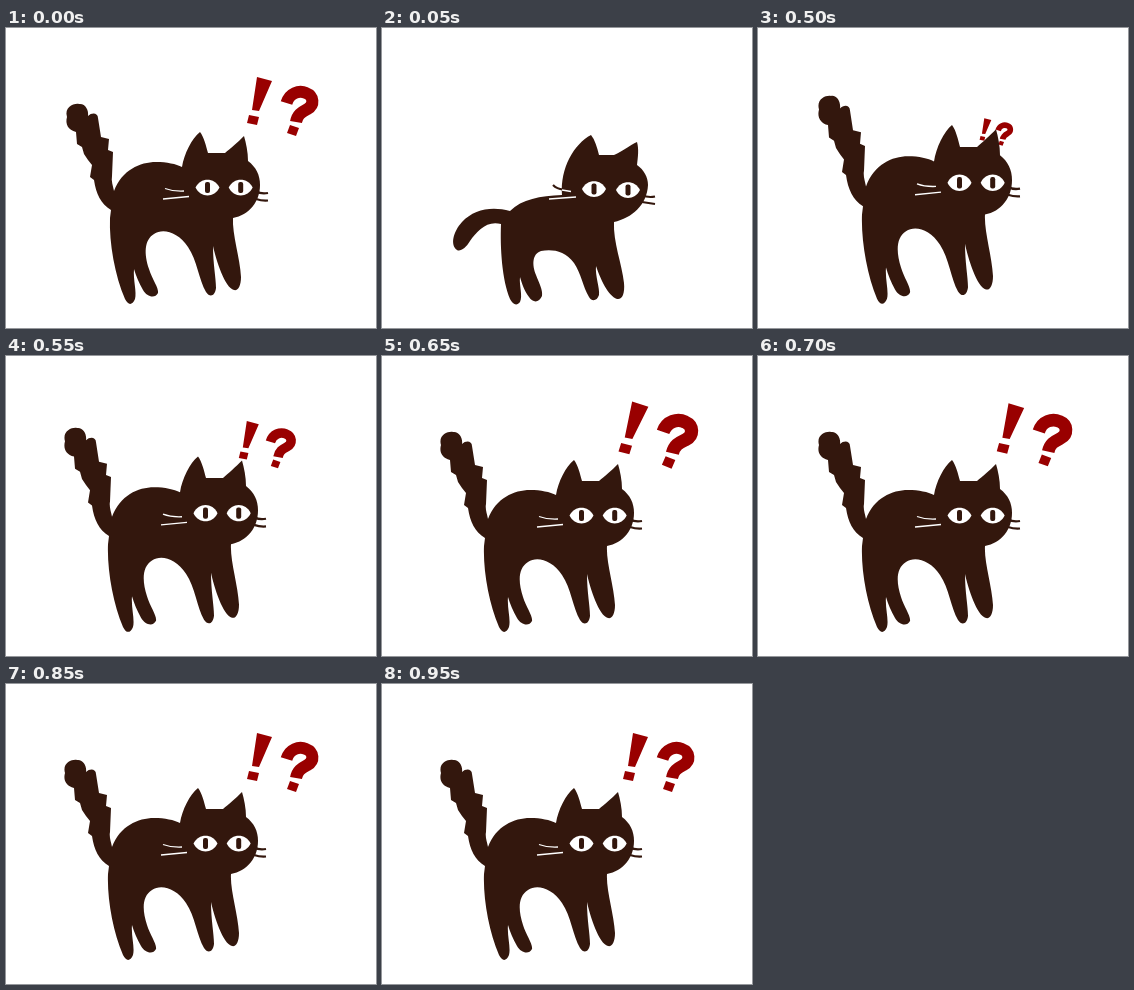
Recreate the animation shown at these times as an HTML page. Size 370x300 px, loop 1000 ms.

```html
<!DOCTYPE html>
<html lang="en">
<head>
<meta charset="utf-8">
<title>Startled cat</title>
<style>
html, body { margin: 0; width: 100%; height: 100%; overflow: hidden; background: #fff; }
svg { display: block; width: 100%; height: 100%; }
.body, .pupil { fill: #33170d; }
.white { fill: #fff; }
.dark, .light, .hook { fill: none; stroke: #33170d; stroke-width: 2.2; }
.light { stroke: #fff; stroke-width: 1.3; }
.red { fill: #990000; }
.hook { stroke: #990000; stroke-width: 12; }
</style>
</head>
<body>
<svg viewBox="0 0 370 300">
  <defs>
    <g id="eye">
      <path class="white" d="M-12 0C-7-10.5 7-10.5 12 0C7 10.5-7 10.5-12 0Z"/>
      <rect class="pupil" x="-2.5" y="-5.5" width="5" height="11" rx="2"/>
    </g>
  </defs>

  <g id="marks">
    <path class="red" d="M251 49L266 53 253 83 246 82ZM243 87L253 89 251 97 241 95ZM284 97L293 100 290 108 281 105Z"/>
    <path class="hook" d="M280.5 75C283.5 65 293 62 300 65C308 68 308.5 77 301.5 81C296 84 291.5 86 290 94"/>
  </g>

  <g id="scared">
    <path class="body" d="M105 182C95 176 90 166 88 152L84 149 86 137 82 132 78 126 76 119 71 116 70 104
      C62 102 59 96 61 89C58 79 68 75 73 76C79 75 83 82 82 88C86 84 92 85 92 90L95 109 103 111 102 122 107 124 106 148
      C105 153 107 158 108 163C116 142 134 134 150 134C161 134 170 136 176 139C178 126 186 110 194 104
      C198 109 200 118 202 125H219C224 121 232 114 238 108C240 115 242 124 242 133C250 139 254 147 254 157
      C254 174 243 187 227 190C226 206 234 230 235 249C235 258 232 263 228 262C219 260 210 232 207 218
      C207 236 210 250 210 260C209 268 204 270 200 264C193 252 191 232 182 219C172 204 157 200 148 206
      C138 212 138 226 143 241C146 251 153 260 152 265C149 271 141 269 137 262C133 255 130 248 128 241
      C127 252 131 264 129 271C126 278 122 277 119 271C109 248 103 215 104 190Z"/>
    <use href="#eye" x="201.5" y="159.5"/><use href="#eye" x="234.7" y="159.5"/>
    <path class="light" d="M159 160.5Q167 163.5 178 163M157 171L183 168.5"/>
    <path class="dark" d="M250 163Q255 166.5 262 165M250 171Q256 173 262 172.5"/>
  </g>

  <g id="low">
    <path class="body" d="M119 196C105 192 95 203 88 213C84 220 78 224 75 222C68 217 71 204 80 194
      C92 181 110 178 128 183C140 171 158 168 180 167C178 140 192 116 209 107C213 112 215 119 217 127H232
      C241 123 248 117 255 114C257 121 256 129 255 137C262 142 266 149 266 157C265 177 250 190 232 194
      C231 214 240 236 242 255C243 266 240 272 235 271C226 268 218 250 214 238C213 248 218 260 217 267
      C215 273 210 274 207 269C201 259 199 245 192 235C183 222 169 221 159 223C150 226 150 237 154 247
      C157 255 161 262 160 268C157 275 151 275 147 269C142 262 140 256 138 249C137 257 141 268 138 274
      C135 278 131 277 128 271C120 252 118 220 119 196Z"/>
    <use href="#eye" x="212" y="161"/><use href="#eye" x="246" y="162"/>
    <path class="dark" d="M171 157Q175 161 181 161.5M260 167Q266 170 273 168.5M260 174L273 176"/>
    <path class="light" d="M180 162L189 163.5M167 171L194 169"/>
  </g>

  <g id="high">
    <path class="body" d="M105 206C84 209 66 199 57 187C50 178 49 169 54 166C61 164 65 172 71 179
      C80 190 92 193 108 190C116 174 140 167 174 166C170 146 185 113 202 106C205 112 207 119 209 127Q217 127 224 125
      Q237 119 247 111C249 119 249 128 248 136C255 141 258 148 258 157C257 175 244 188 226 192
      C226 212 236 235 238 254C238 265 236 270 231 269C222 266 215 247 211 236C209 246 214 257 213 265
      C211 273 206 274 202 268C195 257 193 244 186 233C175 221 157 219 147 223C139 226 139 236 144 245
      C149 253 156 260 155 267C151 273 144 271 139 263C136 258 133 254 131 249C130 257 134 267 131 273
      C128 278 124 276 121 270C110 250 104 226 105 206Z"/>
    <use href="#eye" x="205" y="160"/><use href="#eye" x="239" y="160"/>
    <path class="dark" d="M165 157.5Q170 161 176 161.5M254 164Q259 167 266 165M253 171.5L267 173"/>
    <path class="light" d="M175 162.5L183 163.5M162 171L187 168.5"/>
  </g>
</svg>
<script>
const LOOP = 1000, STEP = 50;
const GROW = [0.47, 0.8, 1.02, 1.1, 1.05];   // size of the marks as they pop out
const RISE = [0, 0.6, 0.92];                 // their way up from behind the ear
const STRETCH = [1.04, 1.02];                // body height at the jump
const el = id => document.getElementById(id);
const show = (id, on) => el(id).setAttribute("display", on ? "inline" : "none");
const move = (id, t) => el(id).setAttribute("transform", t);

function draw(now) {
  const step = Math.floor((now % LOOP) / STEP);
  const jump = step < 1 ? 10 : step - 10;
  const scared = jump >= 0;
  show("low", step >= 1 && step < 5);
  show("high", step >= 5 && step < 10);
  show("scared", scared);
  show("marks", scared);
  if (scared) {
    const size = GROW[jump] ?? 1, away = 1 - (RISE[jump] ?? 1);
    const over = Math.max(0, size - 1);   // the overshoot also tilts the marks
    const x = 277 - 38.5 * away, y = 78.5 + 25.5 * away + 10 * over;
    move("marks", `translate(${x} ${y}) rotate(${30 * over}) scale(${size}) translate(-277 -78.5)`);
    move("scared", `translate(${jump % 2 ? -2 : 0} 277) scale(1 ${STRETCH[jump] ?? 1}) translate(0 -277)`);
  }
}

let start;
function tick(now) {
  start ??= now;
  draw(now - start);
  requestAnimationFrame(tick);
}
draw(0);
requestAnimationFrame(tick);
</script>
</body>
</html>
```
